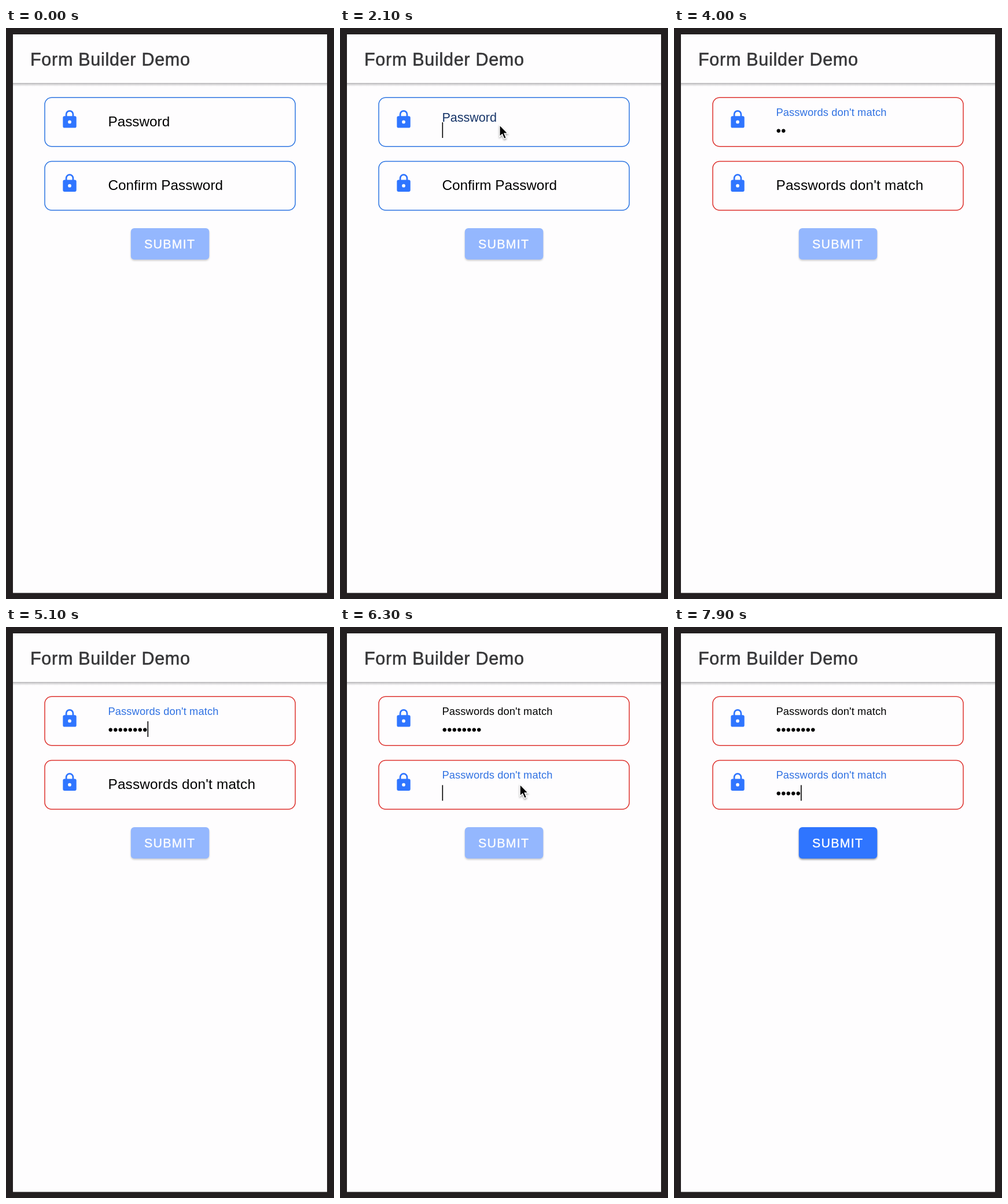
An HTML page for the animation above (8000 ms loop, 567 px wide and 987 px high).

```html
<!DOCTYPE html>
<html lang="en">
<head>
<meta charset="utf-8">
<title>Form Builder Demo</title>
<style>
  html, body { margin: 0; width: 100%; height: 100%; overflow: hidden; background: #231f20; }
  svg { display: block; width: 567px; height: 987px; }
  text { font: 24.3px "Liberation Sans", Arial, sans-serif; white-space: pre; }
  .title { font-size: 30.5px; letter-spacing: .72px; fill: #373739; stroke: #373739; stroke-width: .6px; }
  .border { fill: none; stroke-width: 1.5px; }
  .submit { filter: drop-shadow(0 2px 1.5px rgba(0, 0, 0, .38)); }
  .submit rect { fill: #2f75ff; }
  .submit text { font-size: 21.3px; letter-spacing: 1.3px; fill: #fff; stroke: #fff; stroke-width: .4px; }
  .cursor { fill: #000; stroke: #fff; stroke-width: 1.5px; filter: drop-shadow(0 2px 1.5px rgba(0, 0, 0, .35)); }
</style>
</head>
<body>
<svg viewBox="0 0 567 987">
  <defs>
    <linearGradient id="shade" x2="0" y2="1">
      <stop stop-color="#b4b3b5"/>
      <stop offset=".4" stop-color="#d6d5d7"/>
      <stop offset="1" stop-color="#fefdfe"/>
    </linearGradient>
    <g id="lock" transform="translate(92.5 140.5) scale(1.46)">
      <path d="M7.95 9V6a4.05 4.05 0 0 1 8.1 0V9" fill="none" stroke="#2f75ff" stroke-width="1.9"/>
      <rect x="4" y="8" width="16" height="14" rx="2" fill="#2f75ff"/>
      <circle cx="12" cy="15" r="1.95" fill="#fff"/>
    </g>
  </defs>
  <rect width="567" height="987" fill="#231f20"/>
  <rect x="12" y="11" width="543" height="965.5" fill="#fefdfe"/>
  <rect x="12" y="95" width="543" height="6" fill="url(#shade)"/>
  <text class="title" x="42" y="65.3">Form Builder Demo</text>
  <g id="fields"></g>
  <g class="submit">
    <rect x="215.8" y="346" width="135.5" height="54.3" rx="6"/>
    <text x="239" y="380.5">SUBMIT</text>
  </g>
  <path class="cursor" d="M0 0V20.3L4.6 16.2L8 24L11.6 22.4L8.3 14.8H14.4Z"/>
</svg>
<script>
const LOOP = 8000, STEP = 100;
const TEXT_X = 176.5, DOT_PITCH = 8.5;
const ERROR_AT = 3000, ENABLED_AT = 7100;
const ERROR = "Passwords don't match";
const FOCUS_BLUE = [47, 113, 226];

// float: time of the half-risen label; blur: time focus leaves the field
const fields = [
  { name: "Password", top: 120, float: 2100, blur: 6100,
    keys: [2900, 3400, 4100, 4200, 4500, 4600, 4800, 5100],
    caretOn: [[2100, 2600], [2900, 3900], [4100, 5600]] },
  { name: "Confirm Password", top: 230.3, float: 6100, blur: LOOP,
    keys: [7000, 7200, 7600, 7700, 7900],
    caretOn: [[6200, 6700], [7000, LOOP]] }
];

// [time, x, y] of the pointer tip
const pointerPaths = [
  [[400, 322, 352], [600, 266, 147.5], [1100, 275.8, 167.5], [2900, 275.8, 167.5]],
  [[5500, 275.8, 167.5], [6000, 311, 272], [7000, 311, 272]]
];

const $ = selector => document.querySelector(selector);
const submit = $(".submit"), cursor = $(".cursor");

for (const field of fields) {
  const group = document.createElementNS("http://www.w3.org/2000/svg", "g");
  group.setAttribute("transform", `translate(0 ${field.top - 120})`);
  group.innerHTML = `
    <rect class="border" x="67" y="120.2" width="433" height="84.5" rx="12"/>
    <use href="#lock"/>
    <text class="label"></text>
    <text class="dots" x="${TEXT_X}" y="186"></text>
    <rect class="caret" y="163" width="1.6" height="27"/>`;
  $("#fields").append(group);
  for (const part of ["border", "label", "dots", "caret"]) {
    field[part] = group.querySelector("." + part);
  }
}

const mix = (a, b, p) => a + (b - a) * p;
const ease = p => p * p * (3 - 2 * p);

function drawField(field, t) {
  const failed = t >= ERROR_AT;
  const rise = t < field.float ? 0 : t < field.float + STEP ? .46 : 1;
  const tint = t < field.blur ? rise : 0;
  const count = field.keys.filter(key => t >= key).length;

  field.border.style.stroke = failed ? "#dd322e" : "#2e76e2";
  field.label.textContent = failed ? ERROR : field.name;
  field.label.style.letterSpacing = failed ? ".2px" : "0";
  field.label.style.fill = `rgb(${FOCUS_BLUE.map(c => c * tint)})`;
  field.label.setAttribute("transform",
    `translate(${TEXT_X} ${mix(169.7, 152, rise)}) scale(${mix(1, .75, rise)})`);
  field.dots.textContent = "•".repeat(count);
  field.caret.setAttribute("x", TEXT_X + count * DOT_PITCH);
  field.caret.style.display = field.caretOn.some(([on, off]) => t >= on && t < off) ? "" : "none";
}

function pointerAt(t) {
  const path = pointerPaths.find(p => t >= p[0][0] && t < p[p.length - 1][0]);
  if (!path) return null;
  const i = path.findIndex(point => point[0] > t);
  const [t0, x0, y0] = path[i - 1], [t1, x1, y1] = path[i];
  const p = ease((t - t0) / (t1 - t0));
  return [mix(x0, x1, p), mix(y0, y1, p)];
}

function draw(now) {
  const t = Math.floor(now % LOOP / STEP) * STEP;
  fields.forEach(field => drawField(field, t));
  submit.style.opacity = t < ENABLED_AT ? .51 : 1;
  const pointer = pointerAt(t);
  cursor.style.display = pointer ? "" : "none";
  if (pointer) cursor.setAttribute("transform", `translate(${pointer})`);
}

const start = performance.now();
function tick() {
  draw(performance.now() - start);
  requestAnimationFrame(tick);
}
tick();
</script>
</body>
</html>
```
